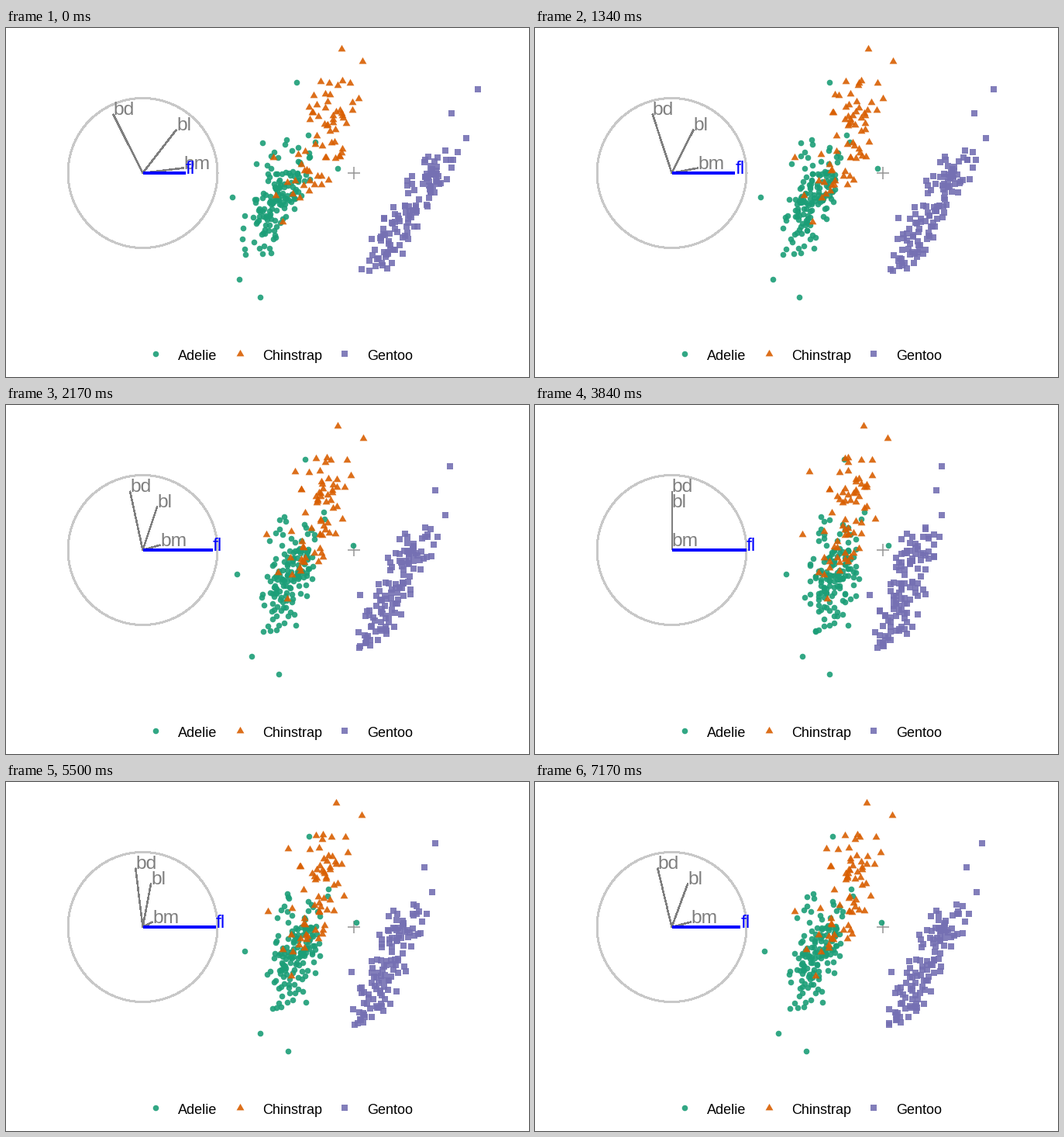
Recreate the animation shown at these times as a matplotlib script. Size 675 by 450 pixels, loop 8000 ms.

```python
import numpy as np
import matplotlib.pyplot as plt
from matplotlib.animation import FuncAnimation

W, H, DPI = 675, 450, 100
PX = 72 / DPI                      # points per pixel
LOOP, STEP = 8000, 20
TICK, FIRST = 834, 500             # time per pose, time of the first change
START, TURN = 0.96, 0.2            # first angle and turn per pose, in radians
MID_X = 424.5                      # projection of the data mean
MM, MIN_X = 3.47, 324              # flipper lengths are whole millimetres
HUB, RADIUS = (176.5, 187), 96.5
GREY = "#7f7f7f"
FONT = "Liberation Sans"


def angle_at(time):
    """The flipper axis turns fully into view, rests one pose, turns back."""
    pose = int(np.floor((time - FIRST) / TICK)) + 1
    return max(START - TURN * pose, 0) if pose < 6 else TURN * (pose - 6)


class Species:
    """Two sexes with normal spread, plus a few extreme birds.

    first, flat: (x at the middle, lean, spread) at the first angle and
    along the flipper axis. extremes: (first x, flat x, y).
    """

    def __init__(self, name, color, marker, size, count, key_x,
                 modes, spread, first, flat, extremes, seed):
        self.name, self.key_x = name, key_x
        self.style = dict(color=color, marker=marker, ms=size * PX, mew=0,
                          ls="", alpha=0.9, antialiased=False)
        rng = np.random.default_rng(seed)
        n = count - len(extremes)
        e_y, e_first, e_flat = 2.4 * np.tanh(rng.normal(size=(3, n)) / 2.2)
        e_flat = 0.45 * e_first + 0.9 * e_flat

        y = np.resize(modes, n) + spread * e_y
        rise = np.mean(modes) - y
        first_x = first[0] + first[1] * rise + first[2] * e_first
        flat_x = flat[0] + flat[1] * rise + flat[2] * e_flat
        flat_x = MIN_X + MM * np.round((flat_x - MIN_X) / MM)

        bulk = np.column_stack([first_x, flat_x, y])
        first_x, flat_x, self.y = np.vstack([bulk, extremes]).T
        self.along = flat_x - MID_X
        self.across = (first_x - MID_X - np.cos(START) * self.along) / np.sin(START)

    def x(self, angle):
        return MID_X + np.cos(angle) * self.along + np.sin(angle) * self.across


SPECIES = [
    Species("Adelie", "#1B9E77", "o", 7.6, 146, 193,
            modes=(243, 192), spread=27, first=(348, 0.3, 18), flat=(386, 0.13, 17),
            extremes=[(375, 399, 70), (292, 324, 218), (301, 345, 324),
                      (328, 380, 347), (428, 456, 181)], seed=4),
    Species("Gentoo", "#7570B3", "s", 8, 119, 437,
            modes=(271, 199), spread=22, first=(521, 0.58, 13), flat=(479, 0.32, 13),
            extremes=[(609, 525, 79), (575, 518, 110), (594, 525, 142),
                      (488, 432, 245), (459, 450, 311)], seed=8),
    Species("Chinstrap", "#D95F02", (3, 0, 0), 11.4, 68, 302,
            modes=(101, 180), spread=22, first=(407, 0.32, 18), flat=(404, 0.2, 16),
            extremes=[(433, 424, 27), (460, 455, 43), (418, 354, 86),
                      (345, 345, 167), (357, 377, 250)], seed=15),
]

# Variable: share of the mixed direction, height in pixels
VARIABLES = {"bl": (0.55, 56), "bd": (-0.485, 76), "bm": (0.665, 6.5), "fl": (0, 0)}

fig = plt.figure(figsize=(W / DPI, H / DPI), dpi=DPI, facecolor="white")
ax = fig.add_axes([0, 0, 1, 1], xlim=(0, W), ylim=(H, 0))
ax.axis("off")

ring = np.linspace(0, 2 * np.pi, 181)
ax.plot(HUB[0] + RADIUS * np.cos(ring), HUB[1] + RADIUS * np.sin(ring),
        color="#c8c8c8", lw=2 * PX, antialiased=False)
ax.plot(449, 187, "+", color="#999999", ms=16 * PX, mew=1.6 * PX)

clouds = [ax.plot([], [], **s.style)[0] for s in SPECIES]
for s in SPECIES:
    ax.plot(s.key_x, 420, **s.style)
    ax.text(s.key_x + 29.3, 428, s.name, family=FONT, size=18 * PX)

arms = {}
for name in VARIABLES:
    main = name == "fl"
    color = "blue" if main else GREY
    line, = ax.plot([], [], color=color, lw=(4 if main else 1.5) * PX,
                    solid_capstyle="butt", antialiased=False, zorder=3)
    label = ax.text(0, 0, name, color=color, size=24.5 * PX, family=FONT, zorder=4)
    arms[name] = line, label


def update(frame):
    angle = angle_at(frame * STEP + STEP / 2)
    for cloud, s in zip(clouds, SPECIES):
        cloud.set_data(s.x(angle), s.y)
    for name, (share, height) in VARIABLES.items():
        reach = np.cos(angle) if name == "fl" else share * np.sin(angle)
        x, y = HUB[0] + RADIUS * reach, HUB[1] - height
        line, label = arms[name]
        line.set_data([HUB[0], x], [HUB[1], y])
        label.set_position((x, y + 1))
    return clouds


anim = FuncAnimation(fig, update, frames=LOOP // STEP, interval=STEP,
                     init_func=lambda: update(0), repeat=True, repeat_delay=0)
plt.show()
```
